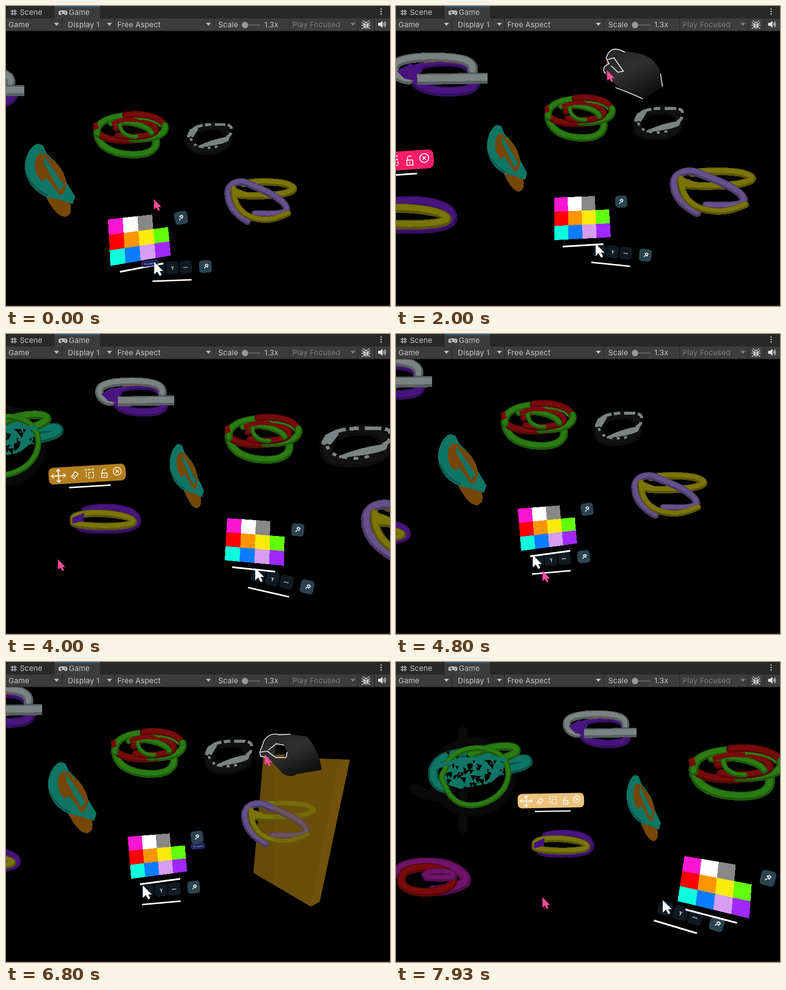
Animation of 776 by 606 pixels, one loop 8 s. Source, as an HTML page:

```html
<!DOCTYPE html>
<html lang="en">
<head>
<meta charset="utf-8">
<title>Game view</title>
<style>
  html, body { margin: 0; width: 100%; height: 100%; overflow: hidden; background: #000; }
  svg { display: block; width: 776px; height: 606px; }
  text { font: 15px Inter, sans-serif; letter-spacing: .2px; fill: #c8c8c8; }
  .world { shape-rendering: crispEdges; fill: none; }
  .ico { fill: none; stroke: #fff; stroke-width: 1.6; }
</style>
</head>
<body>
<svg viewBox="0 0 776 606">
  <defs>
    <linearGradient id="skin" x2=".6" y2="1">
      <stop stop-color="#222"/><stop offset=".5" stop-color="#303030"/><stop offset="1" stop-color="#101010"/>
    </linearGradient>
    <clipPath id="inside"><path d="M540 50H776V606H540z"/></clipPath>
  </defs>

  <g class="world">
    <g id="far"></g>
    <g id="slab" shape-rendering="auto">
      <path fill="#664a08" d="M520 192L589 194L695 197L634 484L616 494L500 426z"/>
      <path fill="#70510a" d="M672 203L695 197L634 484L616 494z"/>
    </g>
    <g id="near"></g>
    <g clip-path="url(#inside)"><path id="veil" fill="#75550f" opacity=".38" d="M520 192L695 197L616 494L500 426z"/></g>
    <g id="post" opacity=".78">
      <path fill="#93660f" d="M378 115L390 111L431 113L428 272L378 272z"/>
      <path fill="#7e570b" d="M378 115L388 112V272H378z"/>
    </g>
  </g>

  <g id="bar">
    <rect id="barBack" x="-78" y="-17" width="156" height="34" rx="10"/>
    <rect id="barHover" x="41" y="-16" width="35" height="32" rx="9" fill="#ff5590" stroke="#ff86b0"/>
    <g class="ico">
      <path d="M-58 -13V13M-72 0H-44M-62 -9l4 -4 4 4M-62 9l4 4 4 -4M-68 -4l-4 4 4 4M-48 -4l4 4 -4 4" stroke-width="2"/>
      <path d="M-32 3l8 -9 6 5 -8 9zM-29 0l6 5"/>
      <path d="M-5 -9H15M-2 -6V8M3 -3h10v11H3z" stroke-dasharray="5 2"/>
      <path d="M29 0h11v9H29zM31 0v-5a4 4 0 0 1 7 -1M34.500 3v3"/>
      <circle cx="61" cy="-2" r="8"/><path d="M58 -5l6 6M64 -5l-6 6"/>
    </g>
    <path d="M-38 25H46" stroke="#fff" stroke-width="3"/>
  </g>

  <g id="tools">
    <g fill="#0f1a22">
      <rect x="1" y="-38" width="25" height="25" rx="6"/>
      <rect x="28" y="-38" width="25" height="25" rx="6"/>
      <rect x="55" y="-38" width="25" height="25" rx="6"/>
    </g>
    <rect x="94" y="-38" width="25" height="25" rx="6" fill="#2b4450"/>
    <path class="ico" d="M39 -28l2 3 2 -3M41 -25v4M63 -25h9" stroke-dasharray="2 1"/>
    <path class="ico" stroke-width="1.2" d="M104 -22l3 -3M106 -28l4 4 2 -4 -3 -2z"/>
    <path d="M0 0H78" stroke="#fff" stroke-width="3"/>
  </g>

  <g id="palette" shape-rendering="crispEdges"></g>
  <path id="handle" stroke="#fff" stroke-width="3.500"/>
  <g id="pin">
    <rect x="-12.500" y="-12.500" width="25" height="25" rx="6" fill="#2b4450"/>
    <path class="ico" stroke-width="1.2" d="M-4 4l3 -3M-2 -3l4 4 2 -4 -3 -2z"/>
  </g>
  <g id="tip">
    <rect x="-16" y="-5.500" width="32" height="11" rx="4" fill="#16204f" stroke="#5a4fd0"/>
    <text y="2" text-anchor="middle" style="font-size:5px;fill:#fff">Pin panel</text>
  </g>

  <g id="handDown">
    <path fill="url(#skin)" d="M388 252C392 240 404 237 415 242L440 247C470 250 490 265 496 290L500 316L458 342C440 335 425 325 405 312L383 290C378 280 380 274 392 271z"/>
    <path class="ico" stroke-width="1.300" d="M385 290C378 282 380 275 392 270L386 258L390 249C398 238 410 238 424 247M387 262L402 258L421 285L410 287L396 274M405 318Q450 335 460 341M496 290L500 316" stroke="#ddd"/>
  </g>
  <g id="handSide">
    <path fill="url(#skin)" d="M516 178C520 160 535 145 550 143L607 150C622 165 635 190 638 218L588 226C580 232 572 232 560 226L530 194L514 190z"/>
    <path fill="#000" d="M545 168L562 168L568 182L566 192L543 190z"/><path fill="#6b4e0b" d="M543 187h21l-2 6h-16z"/>
    <path class="ico" stroke-width="1.400" d="M530 194L514 190L513 182L522 158C530 147 540 143 552 147L575 146M514 182L528 180L545 193L566 193L568 182M530 178L546 165L562 168"/>
  </g>

  <path id="white" fill="#fff" d="M0 0V25L6 19L11 28L15 26L11 18H18z"/>
  <path id="pink" fill="#ff4a9c" d="M0 0V21L5 17L9 24L12 22L9 16H15z"/>

  <path fill="#282828" d="M0 0H776V24H0z"/>
  <path fill="#3c3c3c" d="M98 0H190V24H776V50H0V24H98z"/>
  <path fill="#2c5d87" d="M98 0H190V2H98z"/>
  <path stroke="#232323" d="M0 24.500H98M190 24.500H776M0 50.500H776M113.500 25V50M219.500 25V50M420.500 25V50M573.500 25V50M711.500 25V50M744.500 25V50"/>
  <path fill="#241a1e" d="M0 604H776V606H0z"/>
  <text x="28" y="18">Scene</text><text x="127" y="18">Game</text>
  <text x="5" y="43">Game</text><text x="125" y="43">Display 1</text>
  <text x="225" y="43">Free Aspect</text><text x="429" y="43">Scale</text>
  <text x="522" y="43">1.3x</text><text x="579" y="43" style="fill:#7d7d7d">Play Focused</text>
  <path fill="#c4c4c4" d="M97 34h10l-5 6zM204 34h10l-5 6zM404 34h10l-5 6z"/><path fill="#7d7d7d" d="M696 34h10l-5 6z"/>
  <path stroke="#c4c4c4" stroke-width="1.500" d="M13 7V19M18 7V19M9 10.500H22M9 15.500H22"/>
  <path fill="#c4c4c4" d="M111 9h8q5 0 5 5t-5 4l-2 -2h-4l-2 2q-5 1 -5 -4t5 -5z"/>
  <path stroke="#3c3c3c" stroke-width="1.500" d="M109 13.500h5M111.500 11v5M118 12h2M119 15h2"/>
  <path stroke="#686868" stroke-width="2" d="M484 38.500H514"/><circle cx="483" cy="38.500" r="6.500" fill="#999"/>
  <g fill="#c4c4c4"><circle cx="758" cy="6" r="1.500"/><circle cx="758" cy="11" r="1.500"/><circle cx="758" cy="16" r="1.500"/></g>
  <ellipse cx="727.500" cy="38.500" rx="5.500" ry="7" fill="#c4c4c4"/>
  <path fill="none" stroke="#c4c4c4" stroke-width="1.600" d="M724 32l-3 -3M731 32l3 -3M723 36l-4 -3M732 36l4 -3M722 39h-4M733 39h4M723 43l-4 3M732 43l4 3"/>
  <path stroke="#3c3c3c" d="M722 34.500h11M727.500 35V45"/>
  <path fill="#e4e4e4" d="M752 34h4l5 -4v14l-5 -4h-4z"/><path fill="none" stroke="#e4e4e4" stroke-width="1.500" d="M763 34q2 3 0 6M765 31.500q4 5.500 0 11"/>
</svg>

<script>
const $ = id => document.getElementById(id);
const LOOP = 8000;
const GREEN = '#2a7c12', RED = '#780b0b', TEAL = '#0f7565', ORANGE = '#764609', YELLOW = '#7b7509',
      LILAC = '#66508c', PURPLE = '#48157f', GREY = '#7b8282', DARK = '#121212', PLUM = '#70136a';

const tube = (color, width, d, cap = 'round') => {
  const line = (c, w, more = '') => `<path d="${d}" stroke="${c}" stroke-width="${w}" stroke-linecap="${cap}" ${more}/>`;
  return line(color, width) + line('#000', width, 'opacity=".28"') + line(color, width * .6, 'transform="translate(0 -1.5)"');
};
const fill = (color, d) => `<path fill="${color}" d="${d}"/>`;
const thin = (color, width, d, dash = '') => `<path stroke="${color}" stroke-width="${width}" stroke-dasharray="${dash}" d="${d}"/>`;

let seed = 7;
const rnd = () => (seed = seed * 16807 % 2147483647) / 2147483647;
const shards = () => Array.from({ length: 60 }, () => {
  const x = 100 + rnd() * 118, y = 182 + rnd() * 70, s = 5 + rnd() * 8;
  return `M${x} ${y}l${s} ${s * (rnd() - .4)}l${-s * rnd()} ${s}z`;
}).join('');

// boxes: x, y, width, height in each of the five camera views; ref: the view the art is drawn in
const rings = [
  { ref: 4, boxes: [[-700,200,250,200],[-460,170,260,200],[-140,130,256,205],[-480,120,260,200],[28,138,248,200]], art:
    tube('#0b0b0b', 20, 'M135 140V336') + tube('#0b0b0b', 22, 'M38 256Q70 280 110 262') +
    tube('#0a0a0a', 22, 'M155 162A78 70 0 1 1 154 162') +
    tube(TEAL, 20, 'M98 255C65 245 68 205 100 192S170 182 200 194S262 190 266 200S220 222 180 220') +
    tube(GREEN, 17, 'M150 188C180 172 230 165 242 175S205 200 175 206') +
    fill(TEAL, 'M98 192L215 196L225 215L190 245L130 256L95 245z') + fill('#030303', shards()) +
    tube(GREEN, 12, 'M100 215C110 175 165 165 200 182S235 245 205 270S125 300 105 262S92 235 100 215') +
    thin(TEAL, 8, 'M75 215Q150 185 225 198') },
  { ref: 4, boxes: [[-900,480,180,85],[-560,450,190,88],[-230,405,190,88],[-600,430,180,85],[-12,396,166,79]], art:
    tube(PLUM, 22, 'M0 425C20 400 90 402 115 415S145 440 138 446S100 462 75 462') +
    tube(RED, 18, 'M14 430C20 412 90 408 110 430S90 465 60 465S5 455 12 435') +
    tube(PLUM, 14, 'M58 430C70 420 110 422 115 430S90 437 62 436') },
  { ref: 3, boxes: [[175,212,155,96],[299,178,146,96],[441,161,159,101],[211,133,155,101],[590,166,200,114]], art:
    tube(GREEN, 16, 'M220 178C222 215 262 226 295 226S345 212 338 190') +
    tube(RED, 15, 'M222 180C240 198 275 198 320 192') +
    tube(GREEN, 15, 'M220 182C218 155 245 146 282 143') +
    tube(RED, 15, 'M278 142C310 137 352 146 355 166') +
    tube(GREEN, 15, 'M357 164C362 186 330 194 290 193') +
    tube(RED, 14, 'M258 170C265 150 325 152 337 168S300 193 262 185') +
    tube(GREEN, 12, 'M248 160C260 152 322 160 330 180') + tube(GREEN, 9, 'M268 158C262 175 280 190 300 188') +
    thin(GREEN, 4, 'M280 151C310 145 345 155 348 167') + fill(RED, 'M212 160l8 -4 4 14 -10 4z') +
    thin(RED, 9, 'M250 160Q275 148 300 153') },
  { ref: 3, boxes: [[362,232,97,70],[477,199,106,73],[631,181,152,90],[398,152,102,76],[830,175,180,105]], art:
    tube(DARK, 19, 'M410 200C404 172 430 164 455 163S490 172 489 190S470 216 445 217S408 212 410 196') +
    thin(GREY, 6, 'M405 188C410 165 430 160 460 160S497 160 496 172S492 184 486 188', '13 8 22 5') +
    fill(GREY, 'M402 184L408 171L424 163L426 170L415 188z') +
    fill(GREY, 'M426 207C444 198 465 190 493 186L490 196C475 205 450 207 426 211z') +
    thin(GREY, 5, 'M410 190Q414 207 436 210T470 206', '6 9') },
  { ref: 3, boxes: [[37,278,103,148],[183,240,82,135],[330,222,70,130],[84,202,99,144],[465,228,70,134]], art:
    fill(ORANGE, 'M124 303C135 325 148 345 163 346C175 344 177 332 173 318L152 311z') +
    fill(TEAL, 'M110 202C95 206 84 230 85 250C88 280 105 297 128 307L152 312L178 321L183 306L166 278C160 250 145 238 128 222L120 205z') +
    fill(ORANGE, 'M113 222C100 232 102 262 118 276C122 290 150 310 160 300L166 285C165 260 150 240 135 232C128 222 120 220 113 222z') +
    fill(TEAL, 'M122 226L161 284L152 294L122 240zM116 277L128 270L154 306L138 306z') +
    thin('#0a594d', 4, 'M88 262Q100 290 130 304') },
  { ref: 2, boxes: [[-150,120,188,88],[-16,93,202,91],[179,87,162,81],[-110,44,184,90],[336,97,151,78]], art:
    tube(PURPLE, 12, 'M212 120C240 106 280 104 298 110S316 130 312 140') +
    tube(PURPLE, 18, 'M222 136C228 155 260 159 285 158S318 152 320 142') +
    tube(GREY, 17, 'M212 137C190 135 182 115 194 106C215 93 280 94 303 102Q317 108 316 120') +
    fill(PURPLE, 'M193 121L215 108L235 118L224 139L206 135z') +
    tube(GREY, 20, 'M226 136L340 134', 'butt') + thin('#6b583d', 2, 'M236 106Q260 102 290 106') },
  { ref: 2, boxes: [[-230,420,180,85],[-68,383,194,78],[126,342,149,62],[-135,371,167,57],[272,338,130,58]], art:
    tube(PURPLE, 17, 'M160 357C190 346 255 350 264 372S225 395 195 395S160 394 148 389') +
    tube(YELLOW, 15, 'M136 372C145 357 235 360 255 376S150 392 136 381z') +
    fill('#050505', 'M162 374Q215 368 248 378L205 375z') + fill(PURPLE, 'M134 371L158 361L157 378L134 383z') },
  { ref: 3, near: true, boxes: [[441,347,149,96],[553,325,177,102],[717,333,215,128],[475,278,156,96],[1000,340,300,170]], art:
    tube(YELLOW, 15, 'M515 290C545 284 595 286 610 292S628 303 605 309S525 316 500 312') +
    tube(LILAC, 15, 'M524 366C495 350 481 330 483 305C487 285 515 282 530 292C560 303 598 320 606 337S575 352 540 351') +
    tube(YELLOW, 13, 'M495 300C494 335 515 356 545 361S590 358 610 350') + fill(YELLOW, 'M491 296l18 6 14 6 -24 10z') }
];
for (const ring of rings) {
  ring.el = document.createElementNS('http://www.w3.org/2000/svg', 'g');
  ring.el.innerHTML = ring.art;
  $(ring.near ? 'near' : 'far').append(ring.el);
}

const swatches = ['#fa16d2', '#fff', '#888', '', '#f00', '#ff9500', '#fbea0c', '#62ff0a', '#0cffdc', '#0c7cff', '#d69df0', '#a028ff'];
$('palette').innerHTML = swatches.map(c => `<polygon fill="${c || 'none'}"/>`).join('');
const cells = [...$('palette').children];

// corners: top left, top right, bottom left, bottom right
const paletteQuads = [[206,431,325,418,211,525,333,504],[320,387,429,383,320,473,434,467],[447,372,563,380,442,457,562,468],[246,353,359,344,253,438,366,423],[583,392,721,415,569,483,714,518]];
const handles = [[230,537,318,520],[337,486,419,481],[457,471,544,480],[271,449,352,438],[585,500,689,527]];
const toolLines = [[296,556,375,553],[397,517,475,525],[489,512,572,531],[275,485,353,478],[521,522,608,548]];
const barPoses = [[-160,350,1.1,-4],[-11,314,1.12,-4],[164,283,1,-3.5],[-140,250,1.05,-5],[313,280,.86,-1]];

// timed keys: time, then values
const viewKeys = [[80,0],[880,1],[3530,1],[3980,2],[4330,2],[4740,3],[7080,3],[7930,4]];
const toolShift = [[1800,0,0],[2500,-12,4],[3530,-12,4],[3980,0,0],[5300,0,0],[6000,0,5],[7080,0,5],[7900,0,0]];
const cursorKeys = [[80,299,390],[880,491,555],[1050,491,555],[1700,431,112],[1850,431,112],[2600,388,283],[3000,388,283],[3350,50,305],[3530,50,305],[3980,105,455],[4330,105,455],[4740,296,478],[5300,296,478],[5900,625,480],[6100,625,480],[6750,523,187],[7050,523,187],[7300,296,475]];

const mix = (a, b, p) => a.map((v, i) => v + (b[i] - v) * p);
const smooth = p => p * p * (3 - 2 * p);
const clamp = p => Math.max(0, Math.min(1, p));
const byView = (list, v) => mix(list[Math.floor(v)], list[Math.min(4, Math.floor(v) + 1)], v % 1);
function byTime(keys, t) {
  const i = keys.findIndex(k => k[0] > t);
  if (i === 0) return keys[0].slice(1);
  if (i < 0) return keys.at(-1).slice(1);
  const a = keys[i - 1], b = keys[i];
  return mix(a, b, smooth((t - a[0]) / (b[0] - a[0]))).slice(1);
}
const place = (el, transform) => el.setAttribute('transform', transform);
const show = (id, on) => { $(id).style.display = on ? '' : 'none'; };
const during = (t, a, b) => t >= a && t < b;
const degrees = (dx, dy) => Math.atan2(dy, dx) * 180 / Math.PI;
const growFrom = (x, y, p) => `translate(${x} ${y}) scale(${p}) translate(${-x} ${-y})`;

function drawPalette(v) {
  const q = byView(paletteQuads, v);
  const point = (x, y) => [0, 1].map(i =>
    (q[i] * (1 - x) + q[i + 2] * x) * (1 - y) + (q[i + 4] * (1 - x) + q[i + 6] * x) * y);
  cells.forEach((cell, i) => {
    const x = i % 4, y = Math.floor(i / 4);
    cell.setAttribute('points', [[x, y], [x + 1, y], [x + 1, y + 1], [x, y + 1]].map(([a, b]) => point(a / 4, b / 3)).join(' '));
  });
  const h = byView(handles, v), angle = degrees(h[2] - h[0], h[3] - h[1]);
  $('handle').setAttribute('d', `M${h[0]} ${h[1]}L${h[2]} ${h[3]}`);
  place($('pin'), `translate(${point(1.23, .155)}) rotate(${angle}) scale(${(q[2] - q[0]) / 113})`);
}

function drawTools(t, v) {
  const [x0, y0, x1, y1] = byView(toolLines, v), [sx, sy] = byTime(toolShift, t);
  const dx = (x1 - x0) / 78, dy = (y1 - y0) / 78;
  place($('tools'), `matrix(${dx} ${dy} ${-dy} ${dx} ${x0 + sx} ${y0 + sy})`);
  place($('white'), `translate(${x0 + sx + 5 * dx + 38 * dy} ${y0 + sy + 5 * dy - 38 * dx})`);
}

function drawBar(t, v) {
  const [x, y, s, a] = byView(barPoses, v);
  place($('bar'), `translate(${x} ${y}) rotate(${a}) scale(${s})`);
  $('barBack').setAttribute('fill', t < 3350 ? '#ff1c68' : t < 7600 ? '#b47f1d' : '#ebc27c');
  show('barHover', during(t, 0, 1850));
}

function drawHand(t) {
  const [x, y] = byTime(cursorKeys, t);
  place($('pink'), `translate(${x} ${y})`);
  place($('handDown'), `translate(${x - 388} ${y - 283})`);
  place($('handSide'), `translate(${x - 523} ${y - 187})`);
  show('handDown', during(t, 1300, 3000));
  show('handSide', during(t, 5500, 7050));
  place($('post'), growFrom(431, 112, smooth(clamp((t - 1850) / 750))));
  const slab = growFrom(625, 490, smooth(clamp((t - 6100) / 650)));
  place($('slab'), slab);
  place($('veil'), slab);
  show('post', during(t, 1850, 3300));
  show('slab', during(t, 6100, 7080));
  show('veil', during(t, 6100, 7080));
}

function draw(now) {
  const t = now % LOOP, [v] = byTime(viewKeys, t);
  for (const { el, boxes, ref } of rings) {
    const [x, y, w, h] = byView(boxes, v), r = boxes[ref];
    place(el, `translate(${x} ${y}) scale(${w / r[2]} ${h / r[3]}) translate(${-r[0]} ${-r[1]})`);
  }
  drawPalette(v);
  drawTools(t, v);
  drawBar(t, v);
  drawHand(t);
  show('tip', t < 140 || during(t, 6000, 7080));
  place($('tip'), t < 140 ? 'translate(291 520) rotate(-8)' : 'translate(388 372) rotate(-4) scale(.86)');
}

let start;
function frame(now) {
  start ??= now;
  draw(now - start);
  requestAnimationFrame(frame);
}
draw(0);
requestAnimationFrame(frame);
</script>
</body>
</html>
```
